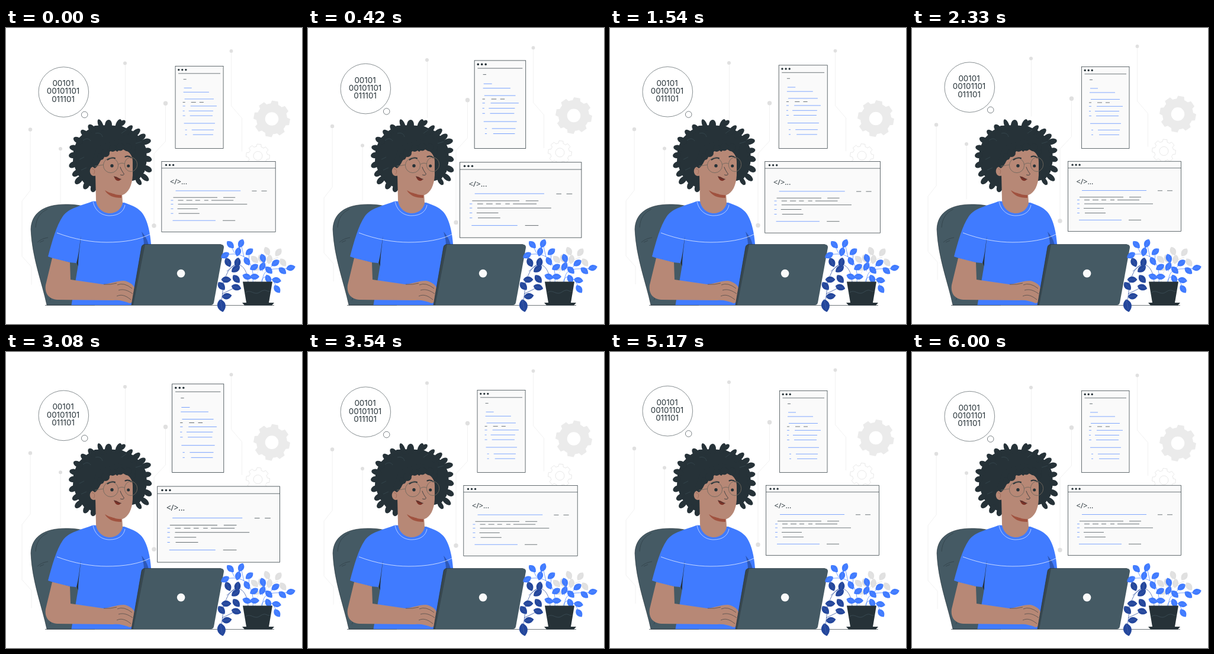
Recreate the animation shown at these times as an HTML page with a canvas. Size 500 by 500 pixels, loop 6.04 s.

```html
<!DOCTYPE html>
<html lang="en">
<head>
<meta charset="utf-8">
<title>Programmer at work</title>
<style>
html, body { margin: 0; width: 100%; height: 100%; overflow: hidden; background: #fff; }
canvas { display: block; width: 500px; height: 500px; }
</style>
</head>
<body>
<canvas id="stage"></canvas>
<script>
const LOOP = 6040, LEAD = 40;
const INK = '#263238', SLATE = '#455a64', BLUE = '#407bff', NAVY = '#24479c';
const SKIN = '#b78876', PALE = '#ebebeb', GREY = '#e0e0e0', PAPER = '#fafafa';

const canvas = document.getElementById('stage');
const dpr = window.devicePixelRatio || 1;
canvas.width = canvas.height = 500 * dpr;
const c = canvas.getContext('2d');

function shape(d, fill, stroke, width = 0.7) {
  const p = new Path2D(d);
  if (fill) { c.fillStyle = fill; c.fill(p); }
  if (stroke) { c.strokeStyle = stroke; c.lineWidth = width; c.stroke(p); }
}

function disc(x, y, r, fill, stroke, width = 0.7, ry = r) {
  c.beginPath();
  c.ellipse(x, y, r, ry, 0, 0, Math.PI * 2);
  if (fill) { c.fillStyle = fill; c.fill(); }
  if (stroke) { c.strokeStyle = stroke; c.lineWidth = width; c.stroke(); }
}

function text(s, x, y, font, align) {
  c.font = font;
  c.textAlign = align;
  c.fillStyle = INK;
  c.fillText(s, x, y);
}

// One row of code strokes: y, colour, then pairs of start and end
function row(y, color, ...xs) {
  c.strokeStyle = color;
  c.lineWidth = 0.65;
  c.beginPath();
  for (let i = 0; i < xs.length; i += 2) {
    c.moveTo(xs[i], y);
    c.lineTo(xs[i + 1], y);
  }
  c.stroke();
}

function gear(x, y, outer, inner, hole, turn, fill, stroke) {
  const step = Math.PI / 4;
  c.beginPath();
  for (let i = 0; i < 8; i++) {
    const a = i * step + turn;
    for (const [off, r] of [[-0.26, inner], [-0.17, outer], [0.17, outer], [0.26, inner]]) {
      c.lineTo(x + r * Math.cos(a + off), y + r * Math.sin(a + off));
    }
    c.arc(x, y, inner, a + 0.26, a + step - 0.26);
  }
  c.closePath();
  c.moveTo(x + hole, y);
  c.arc(x, y, hole, 0, Math.PI * 2, true);
  if (fill) { c.fillStyle = fill; c.fill('evenodd'); }
  if (stroke) { c.strokeStyle = stroke; c.lineWidth = 0.8; c.stroke(); }
}

function circuits() {
  const wires = [
    'M41 172V275L27 293V386L43 404V434', 'M92 204V298', 'M201.5 60V158',
    'M380.5 39.5V132L398.5 153V209', 'M269.5 127V192L250 213V333'
  ];
  for (const d of wires) shape(d, null, '#e9e9e9', 0.65);
  const nodes = [[41, 172, 3.2], [92, 204.5, 3], [201, 60, 3], [380.5, 39.5, 2.9],
    [269.5, 127.8, 3.7], [250, 334.5, 3.7]];
  for (const [x, y, r] of nodes) disc(x, y, r, GREY);
}

function bubble() {
  disc(97.3, 108.7, 42.3, '#fff', INK, 0.55);
  disc(132.7, 147, 5.3, '#fff', INK, 0.6);
  const font = '13.4px Inter, "Open Sans", sans-serif';
  ['00101', '00101101', '011101'].forEach((s, i) => text(s, 96.5, 98.7 + i * 13.3, font, 'center'));
}

function frame(x, y, w, h, head) {
  c.fillStyle = PAPER;
  c.fillRect(x, y, w, h);
  c.strokeStyle = INK;
  c.lineWidth = 0.7;
  c.strokeRect(x, y, w, h);
  for (let i = 0; i < 3; i++) disc(x + 5.7 + head[0] + i * 6, y + 6, 1.65, INK);
  row(y + head[1], INK, x + head[2], x + w - head[2]);
}

function windows() {
  frame(286.5, 65.5, 80.5, 138, [0, 12.2, 5]);
  row(87.5, INK, 300, 305);
  row(102, BLUE, 301, 314);
  row(109, BLUE, 300, 343);
  row(120.5, BLUE, 302, 351);
  row(126, INK, 299, 303, 313, 321, 327, 334);
  row(132.3, BLUE, 299, 303, 312, 356);
  row(140.5, BLUE, 299, 302, 309, 350);
  row(148.5, BLUE, 299, 303, 311, 349);
  row(161.3, BLUE, 301, 353);
  row(172.3, BLUE, 303, 306, 314, 351);
  row(180.3, BLUE, 303, 306, 316, 350);

  frame(263.5, 225.2, 191, 118.3, [1.9, 11.3, 0]);
  text('</>...', 277.5, 263.5, '500 12.5px "Open Sans", "Noto Sans", sans-serif', 'left');
  row(274.5, BLUE, 287, 396);
  row(274.8, INK, 415, 423, 431, 440);
  row(285.7, INK, 283, 357, 367, 387);
  row(290.5, INK, 291, 300, 305, 315, 320, 328, 335, 342, 347, 384);
  row(297, INK, 291, 407);
  row(304.6, INK, 290, 324);
  row(312.5, INK, 292, 327);
  for (const y of [290.5, 297, 304.6, 312.5]) row(y, BLUE, 279, 283);
  row(324.4, BLUE, 282, 354);
  row(324.4, INK, 366, 387);
}

function chair() {
  shape('M69 468C61 430 44 388 42 340C43 313 63 298 101 298C126 298 150 303 160 320L150 468Z', SLATE, INK, 0.6);
  shape('M50 337C51 320 59 311 70 306M53 362C60 356 66 355 71 354M57 362L64 359M82 445L74 460', null, INK, 0.5);
}

function hair() {
  shape('M134 175L150 165L172 164L196 166L214 174L230 188L237 204L238 224L234 243L225 255L214 258L152 272L132 262L120 246L113 226L114 205L121 188Z', INK);
  // Curls around the edge: centre, radii, tilt in degrees
  const curls = [
    [160, 164, 4, 10.5, -22], [173, 164, 6, 9, 5], [190, 163, 4.5, 9.5, 22], [196, 161, 4, 7, 50],
    [206, 173, 4.5, 11, 42], [218, 178, 5, 11, 48], [228, 185, 5, 9, 55], [236, 192, 5, 9, 75],
    [238, 207, 4.5, 7.5, 80], [239, 221, 5, 7.5, 110], [239, 238, 5, 8, 120], [234, 252, 4.5, 9, 130],
    [224, 259, 4, 7, 145], [145, 170, 5, 8.5, -40], [134, 179, 5, 9.5, -50], [122, 190, 5, 9, -60],
    [116, 203, 5, 9, -75], [113, 215, 5, 7, 80], [113, 231, 5, 7, 60], [119, 245, 5, 8, 55],
    [123, 257, 5, 8.5, 45], [136, 265, 5, 8, 30], [148, 270, 5, 7.5, 15]
  ];
  c.fillStyle = INK;
  for (const [x, y, rx, ry, deg] of curls) {
    c.beginPath();
    c.ellipse(x, y, rx, ry, deg * Math.PI / 180, 0, Math.PI * 2);
    c.fill();
  }
  shape('M130 190C136 185 141 187 143 191M151 178C159 176 162 180 163 184M195 178L203 172M219 195L229 192M124 222L132 218M127 240L136 236', null, SLATE, 0.45);
}

function shirt() {
  shape('M147 292.5C125 301 106 304 96 318C85 334 78 360 71 386Q94 395 118 397L122 400L110.5 468H226L246 380C245 350 240 323 228 310C220 302 211 299 200 295Z', BLUE);
  shape('M126.5 351C124 369 123 382 119 397L122 402C122 385 125 370 126.5 351Z', INK);
  shape('M229 344C236 352 240 360 241 368L233 367C233 358 231 351 229 344Z', '#2d58b8');
  shape('M86 346C115 357 145 362 170 362C199 362 225 358 244 348', null, '#fff', 0.7);
}

function head() {
  shape('M151 246L152 291C153 304 164 313 175 313C187 313 195 305 197 296L195 260Z', SKIN);
  shape('M147 293C150 308 161 317 175 317C190 317 199 310 201 299', null, '#fff', 0.6);
  shape('M167 274C176 280 186 281 195 281V287C181 287 172 283 167 274Z', '#a0523f');
  disc(148.5, 242, 6.8, SKIN, null, 0, 8);
  shape('M151 250C150 226 160 206 183 203C201 201 214 211 214 226V249C213 266 207 278 197 282C183 284 164 274 151 250Z', SKIN);
  shape('M150 237C157 233 158 224 164 219C170 214 175 210 180 204L188 209L194 203L203 208L210 203L217 218L219 200L190 188L154 200L143 232Z', INK);
  const locks = [[160, 217, 6], [168, 211, 7], [180, 203, 6], [193, 201, 6.5], [206, 202, 6.5], [214, 209, 5]];
  for (const [x, y, r] of locks) disc(x, y, r, INK);
  shape('M145 238C150 237 151 243 148 247', null, '#8d5d4c', 0.6);

  c.lineCap = 'round';
  shape('M171.5 222.5Q177 218 184 220M201.5 217.5Q207 215 211.5 219', null, INK, 2.1);
  shape('M193 235C195 241 198 244 199.5 247C198 249 196 249 193.5 248', null, INK, 0.8);
  c.lineCap = 'butt';
  disc(179, 232.7, 2.7, INK);
  disc(206.7, 233, 2.5, INK);
  disc(177, 232, 12.6, null, '#72695f', 0.9);
  disc(211, 230.5, 10.7, null, '#72695f', 0.9, 12);
  shape('M189.4 230.5Q195 226.5 200.5 229.5M164.5 231L150 233.5', null, '#72695f', 0.9);
  shape('M182.5 251C186 250 190 254 194 255.5C191 260 185 259 182.5 251Z', '#7c3328');
  shape('M182 250.5Q188 254.5 195 255.5', null, INK, 0.6);
}

function arm() {
  shape('M78 388.5L108 396L109 425L164 433C176 432 187 427 199 427C207 428 215 433 217 439L214 463L209 465C199 461 191 459 181 460L87 459C72 458 65 448 67 434Z', SKIN);
  shape('M188 434Q199 429 213 440M190 443C199 440 207 444 214 449M187 453C197 448 206 455 211 459M165 433Q177 434 187 431', null, INK, 0.55);
}

function laptop() {
  shape('M229 370Q230 365.5 235 365.5H363Q368.5 366 368 371L351 464Q350 468 346 468H212Z', SLATE);
  shape('M229 370Q230 365.5 235 365.5L215 468H212Z', '#37474f');
  shape('M212 468L229 370Q230 365.5 235 365.5H363', null, INK, 0.6);
  disc(295.6, 414.6, 6.8, PAPER);
}

// Almond leaf whose middle sits at x, y
function leaf(x, y, deg, len, color) {
  const h = len / 2, w = len * 0.42;
  c.save();
  c.translate(x, y);
  c.rotate(deg * Math.PI / 180);
  shape(`M${-h} 0C${-h * 0.5} ${-w} ${h * 0.4} ${-w} ${h} 0C${h * 0.4} ${w} ${-h * 0.5} ${w} ${-h} 0Z`, color);
  shape(`M${-h} 0H${h * 0.6}`, null, 'rgba(255,255,255,.3)', 0.35);
  c.restore();
}

function leaves(list, color, len) {
  for (const [x, y, deg] of list) leaf(x, y, deg, len, color);
}

function plant() {
  shape('M421 430C422 405 438 396 460 387M433 404L441 378M445 394L468 396', null, GREY, 0.8);
  leaves([[441, 377, 65], [460, 379, 125], [468, 396, 55], [445, 391, 100], [431, 390, 65], [420, 391, 45], [421, 405, 20]], GREY, 16);

  shape('M417 430C420 400 407 376 373 383M402 387L397 365M386 380L379 366M410 394L411 378M433 430C434 399 454 410 483 405M444 407L455 397M431 430C433 414 451 418 458 441M433 411L434 388', null, BLUE, 0.7);
  shape('M409 430C407 393 379 386 368 430L363 470M370 424L364 434M373 411L389 398M365 449L388 438', null, NAVY, 0.7);

  leaves([[375, 396, 65], [388, 407, 145], [372, 425, 0], [389, 424, 50], [389, 438, 15], [364, 436, 50], [373, 453, -8], [391, 396, 100]], NAVY, 17);
  leaf(364, 469, 78, 22, NAVY);
  leaves([[379, 366, 45], [397, 364, 115], [370, 384, 150], [392, 378, 105], [411, 378, 140], [407, 394, 60],
    [419, 404, 150], [434, 389, 70], [433, 403, 120], [444, 409, 45], [455, 397, 145], [467, 410, 40],
    [481, 405, -15], [457, 426, 10], [443, 424, 65], [458, 441, 55], [420, 420, 0], [407, 420, 20]], BLUE, 16);

  shape('M400 428.5H450L444 464H406Z', INK);
  shape('M399 464H453L449 468.5H403Z', INK);
  shape('M404 447C414 440 419 453 429 446S440 446 446 445', null, SLATE, 0.6);
}

// Two beats per loop, linear between the stops
function beat(u) {
  const stops = [[0, 0], [0.1, 1], [0.3, 0], [0.4, 0], [0.5, 1], [0.6, 0], [1, 0]];
  const i = stops.findIndex(s => s[0] > u);
  const [a, va] = stops[i - 1], [b, vb] = stops[i];
  return 1 + 0.1 * (va + (vb - va) * (u - a) / (b - a));
}

function draw(now) {
  const u = ((now + LEAD) % LOOP) / LOOP;
  const wave = (u * 4) % 1;
  const lift = -10 * (1 - Math.abs(1 - 2 * wave));
  const zoom = beat(u);

  c.setTransform(dpr, 0, 0, dpr, 0, 0);
  c.fillStyle = '#fff';
  c.fillRect(0, 0, 500, 500);

  c.save();
  c.translate(0, lift);
  circuits();
  gear(449, 154, 31, 26, 11.3, 0.18, PALE);
  gear(425.5, 216.5, 20, 16, 7.5, 0.1, null, '#e2e2e2');
  bubble();
  c.restore();

  c.save();
  c.translate(357, 204);
  c.scale(zoom, zoom);
  c.translate(-357, -204);
  windows();
  c.restore();

  chair();
  row(468.5, INK, 66, 453);
  hair();
  shirt();
  head();
  arm();
  laptop();
  plant();
}

const start = performance.now();
function tick() {
  draw(performance.now() - start);
  requestAnimationFrame(tick);
}
tick();
</script>
</body>
</html>
```
